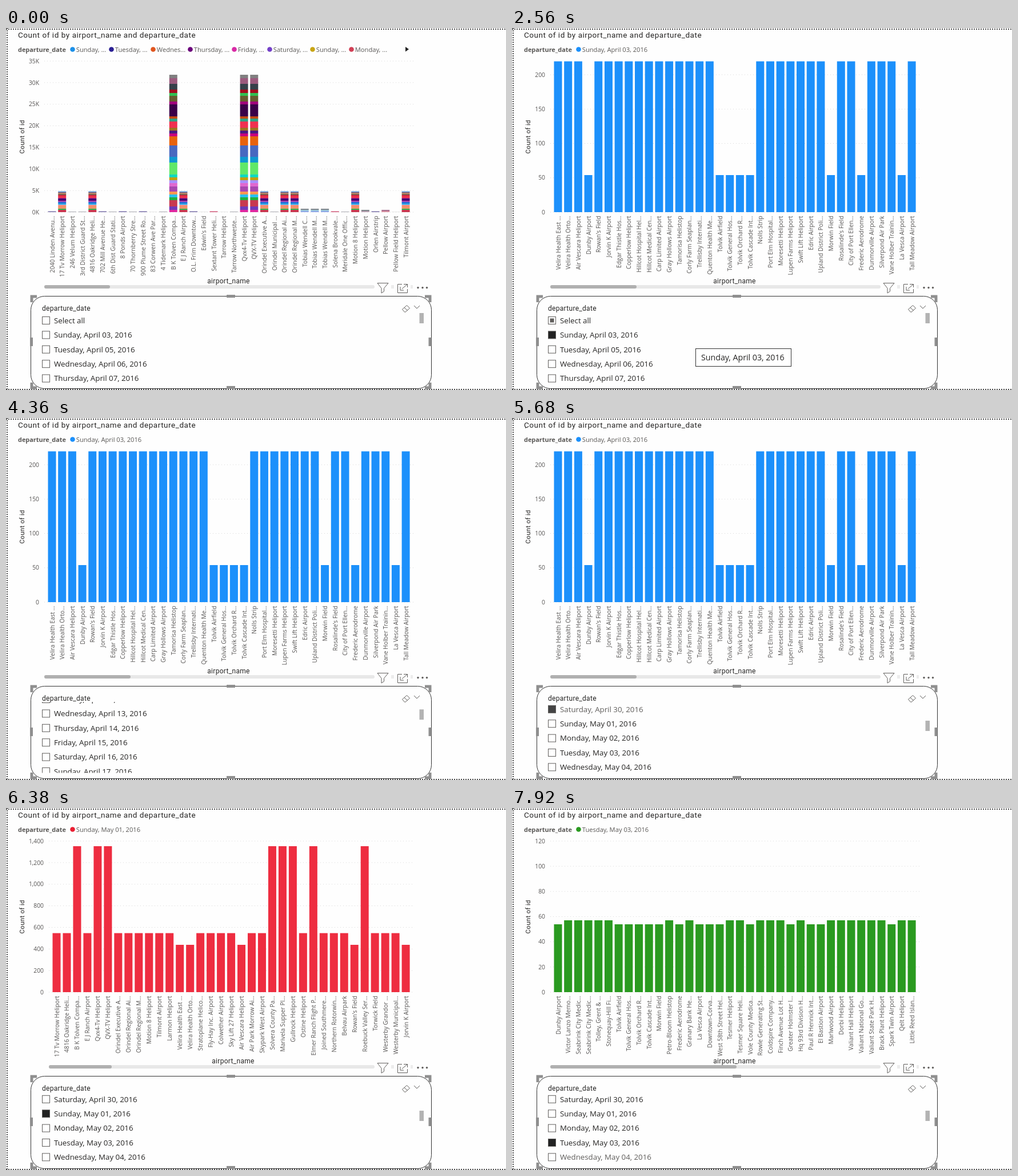
An HTML page that plays this animation: 875 by 635 pixels, repeating every 7.99 s.

```html
<!DOCTYPE html>
<html lang="en">
<head>
<meta charset="utf-8">
<style>
html, body { margin: 0; width: 100%; height: 100%; overflow: hidden; background: #fefefe; }
svg { display: block; width: 875px; height: 635px; font-family: "Open Sans", "Noto Sans", sans-serif; }
.din { font-family: Roboto, sans-serif; letter-spacing: .3px; font-size: 12px; fill: #252423; }
.title { font-size: 13.5px; letter-spacing: .55px; }
.legend { font-size: 11.15px; fill: #595755; }
.heading { font-size: 10.9px; font-weight: 700; }
.axis { font-size: 10.3px; fill: #555352; }
.row { font-size: 13.3px; }
.line { fill: none; stroke: #605e5c; }
</style>
</head>
<body>
<svg id="stage" viewBox="0 0 875 635"></svg>
<script>
const LOOP = 7990, BASE = 323, PLOT = 265, ROW = 25.4;
const BIG = '4 e028a0|6 7038b8|11 c83850|5 20b040|5 28c0f0|5 ff9850|9 a848b0|6 e068d0|5 a890ff|5 c0a010|5 10d8c0|21 60e868|10 1098d0|20 4868c0|16 e8620c|5 c8007e|5 4a1a80|5 a07020|11 f03050|5 30a085|4 c24a10|21 3a0048|5 a0007a|10 665d2e|5 30c050|6 a00c1c|10 36404a|10 9b5a7d|6 808080';
const MID = '4 c83850|2 30b850|6 f2906a|1 e58fc0|2 28b8e8|3 2870d8|2 b040b0|4 4a0070|1 c83088|5 e83048|1 303038|2 c89060|2 806070|2 88b0e0';

const charts = [
  {
    end: 1580, step: 5, max: 35, unit: 'K', left: 67, thumb: 182,
    levels: {
      T: BIG, M: MID, s: '2 8fa8e8|2 9bc8d8|2 80868c', r: '2 b8a0b0|2 80868c', p: '2 d890a0|2 a87090',
      q: '1.5 7a70a8', c: '1.5 d05878', a: '1 a8a8b0', o: '.5 d0d0d0'
    },
    bars: 'qMaaMqaqaqoaTMqocoaTTMaMMssscaMrqpoM',
    legend: [
      [116, '1c90e8', 'Sunday, ...'], [184, '2a1f93', 'Tuesday, ...'], [257, 'e0561f', 'Wednes...'],
      [322, '6b007b', 'Thursday, ...'], [399, 'd82aa5', 'Friday, ...'], [461, '7440c8', 'Saturday, ...'],
      [536, 'c8a514', 'Sunday, ...'], [604, 'd13f55', 'Monday, ...']
    ],
    names: '2040 Linden Avenu...|17 Tv Morrow Heliport|246 Velum Heliport|3rd District Guard St...|4816 Oakridge Heli...|702 Mill Avenue He...|6th Dist Guard Stati...|8 Ponds Airport|70 Thornberry Stre...|900 Plume Street Ro...|83 Corwen Ave Par...|4 Tidemark Heliport|B K Tolven Compa...|E J Ranch Airport|O.L. Frim Downtow...|Edwin\'s Field|Sextant Tower Heli...|Tarrow Heliport|Tarrow Northweste...|Qvx4-Tv Heliport|QVX-TV Heliport|Orindel Executive A...|Orindel Municipal ...|Orindel Regional Ai...|Orindel Regional M...|Tobias Wendell C...|Tobias Wendell M...|Tobias Wendell M...|Solena Brookvale...|Meridale One Offic...|Motion 8 Heliport|Motion Heliport|Orlen Airstrip|Pellow Airport|Pellow Field Heliport|Tilmont Airport'
  },
  {
    end: 6170, step: 50, max: 219.9, left: 67, thumb: 218,
    levels: { H: '264.5 1c90fb', L: '65 1c90fb' },
    bars: 'HHHLHHHHHHHHHHHHLLLLHHHHHHHLHHLHHHLH',
    legend: [[116, '1c90fb', 'Sunday, April 03, 2016']],
    names: 'Velira Health East ...|Velira Health Orto...|Air Vescara Heliport|Dunby Airport|Rowan\'s Field|Jorvin K Airport|Edgar Thistle Hos...|Copperlow Heliport|Hillcot Hospital Hel...|Hillcot Medical Cen...|Carp Limited Airport|Gray Hollows Airport|Tamorisa Helistop|Corly Farm Seaplan...|Trellisby Internati...|Quenton Health Me...|Tolvik Airfield|Tolvik General Hos...|Tolvik Orchard R...|Tolvik Cascade Int...|Nolls Strip|Port Elm Hospital...|Moresetti Heliport|Lupen Farms Heliport|Swift Lift Heliport|Edric Airport|Upland District Poli...|Morwin Field|Rosalinde\'s Field|City of Port Ellen...|Frederic Aerodrome|Dunmorville Airport|Silverpond Air Park|Vane Holber Trainin...|La Vesca Airport|Tall Meadow Airport'
  },
  {
    end: 6940, step: 200, max: 1400, left: 75, thumb: 185,
    levels: { H: '256 ee2d40', M: '103.5 ee2d40', L: '83 ee2d40' },
    bars: 'MMHMHHMMMMMMLLMMMMLMMHHHMHMMMLHMMML',
    legend: [[116, 'ea1f33', 'Sunday, May 01, 2016']],
    names: '17 Tv Morrow Heliport|4816 Oakridge Heli...|B K Tolven Compa...|E J Ranch Airport|Qvx4-Tv Heliport|QVX-TV Heliport|Orindel Executive A...|Orindel Regional Ai...|Orindel Regional M...|Motion 8 Heliport|Tilmont Airport|Larmon Heliport|Velira Health East ...|Velira Health Orto...|Stratoplane Helico...|Fly-Hay Inc. Airport|Colwether Airport|Sky Lift 27 Heliport|Air Vescara Heliport|Air Park Morrow Ai...|Skypark West Airport|Solvera County Pa...|Marivela Supper Pl...|Gullrock Heliport|Ostine Heliport|Elmer Ranch Flight P...|Joined Southmere...|Northern Rotorwin...|Belvau Airpark|Rowan\'s Field|Roebuck Valley Ser...|Torwick Field|Westerby Grandor ...|Westerby Municipal...|Jorvin K Airport'
  },
  {
    end: LOOP, step: 20, max: 120, left: 67, thumb: 393,
    levels: { H: '126 2a9a20', L: '119 2a9a20' },
    bars: 'LHHHHHLLLLLHLHLLLHHLHHHLHLLHHHHHHLHH',
    legend: [[116, '2a9a20', 'Tuesday, May 03, 2016']],
    names: 'Dunby Airport|Victor Lanzo Memo...|Seabrink City Medic...|Seabrink City Medic...|Tolley, Grent &amp; ...|Stonequay-Hill Fi...|Tolvik Airfield|Tolvik General Hos...|Tolvik Orchard R...|Tolvik Cascade Int...|Morwin Field|Petro-Bloom Helistop|Frederic Aerodrome|Granary Bank He...|La Vesca Airport|Downtown-Corva...|West 58th Street Hel...|Tesmer Heliport|Tesmer Square Heli...|Vole County Medica...|Rowle Generating St...|Coldspire Company...|Finch Avenue Lot H...|Greater Holmster I...|Hq 93rd Division H...|Paul R Hennick Int...|El Bastion Airport|Marlwood Airport|Dorbi Heliport|Valiant Hall Heliport|Valiant National Go...|Valiant State Park H...|Brack Plant Heliport|Spark Twin Airport|Qelt Heliport|Little Reed Islan...'
  }
];

const text = (x, y, s, attrs = '') => `<text x="${x}" y="${y}" ${attrs}>${s}</text>`;
const rect = (x, y, w, h, fill, attrs = '') =>
  `<rect x="${x}" y="${y}" width="${w}" height="${h}" fill="${fill}" ${attrs}/>`;
const path = (d, attrs = 'class="line"') => `<path d="${d}" ${attrs}/>`;

function stack(x, spec) {
  let y = BASE, out = '';
  for (const part of spec.split('|')) {
    const [h, color] = part.split(' ');
    y -= h;
    out += rect(x, y, 14, h, '#' + color);
  }
  return out;
}

function drawChart(c) {
  let out = '';
  for (let v = 0; v <= c.max; v += c.step) {
    const y = BASE - v / c.max * PLOT;
    out += path(`M${c.left} ${y}H714`, 'stroke="#d8d8d8" stroke-dasharray="1 4"');
    out += text(c.left - 9, y + 3.7, v.toLocaleString('en-US') + (c.unit || ''), 'class="axis" text-anchor="end"');
  }
  const names = c.names.split('|'), first = c.left + 13.5;
  const pitch = (699.6 - first) / (names.length - 1);
  names.forEach((name, i) => {
    const x = first + i * pitch;
    out += stack(x - 7, c.levels[c.bars[i]]);
    out += `<text class="axis" text-anchor="end" transform="translate(${x + 4} 329.5) rotate(-90)">${name}</text>`;
  });
  for (const [x, color, label] of c.legend)
    out += `<circle cx="${x + .5}" cy="37.5" r="4.3" fill="#${color}"/>` + text(x + 6.8, 41.7, label, 'class="legend"');
  if (c.legend.length > 1) out += path('M699 33l6 4.3l-6 4.3z', 'fill="#222"');
  out += text(c.left + 322.5, 448, 'airport_name', 'class="din" text-anchor="middle"');
  out += rect(c.left, 451, 645 - c.left, 6, '#e8e8e8', 'rx="3"');
  out += rect(c.left, 451, c.thumb - c.left, 6, '#b0b0b0', 'rx="3"');
  return `<g class="chart">${out}</g>`;
}

function rowLabel(i) {
  if (!i) return 'Select all';
  return new Date(2016, 3, i === 1 ? 3 : i + 3).toLocaleDateString('en-US',
    { weekday: 'long', month: 'long', day: '2-digit', year: 'numeric' });
}

function drawRow(i) {
  const y = 513 + i * ROW;
  return `<g class="row">${rect(63.5, y - 6.5, 13, 13, '#fff', 'stroke="#605e5c"')}
    ${i ? '' : rect(66.5, y - 3.5, 7, 7, '#605e5c', 'id="partial"')}${text(84, y + 4.7, rowLabel(i))}</g>`;
}

const handles = [[386, 468, 15, 5], [386, 628, 15, 5], [42, 543, 5, 15], [739.5, 543, 5, 15]]
  .map(h => rect(...h, '#8f8f8f')).join('');

document.getElementById('stage').innerHTML = `
  <defs><clipPath id="list"><rect x="60" y="498" width="640" height="124.5"/></clipPath></defs>
  ${path('M0 2H875M2 0V635M0 634H875', 'stroke="#4a4a4a" stroke-width="2" stroke-dasharray="2 2"')}
  ${text(21, 17, 'Count of id by airport_name and departure_date', 'class="din title"')}
  ${text(21, 41.7, 'departure_date', 'class="legend heading"')}
  <text class="din" style="font-size:11.5px" transform="translate(32 220.5) rotate(-90)">Count of id</text>
  ${charts.map(drawChart).join('')}
  <circle id="dot" r="1" fill="#444"/>
  ${rect(674, 451, 5, 6, '#ececec')}${rect(708, 451, 4, 6, '#ececec')}
  ${path('M650 447.5H669L661.5 456.5V462L657 465V456.5Z')}
  ${path('M693 449.5H685.5V464.5H702.5V458M696 449.5H702.5V455M702.5 449.5L693 457.5M690 454V460H696')}
  ${[721, 729, 736.5].map(x => `<circle cx="${x}" cy="455.5" r="1.7" fill="#605e5c"/>`).join('')}
  ${rect(43.5, 470.5, 701, 162, '#fefefe', 'rx="24" stroke="#333"')}
  ${path('M45 481V471H54M733 471H742V481M45 622V631H54M733 631H742V622', 'fill="none" stroke="#8f8f8f" stroke-width="5"')}
  ${handles}
  ${text(63, 496, 'departure_date', 'class="din"')}
  ${path('M693.5 493.5L701.5 486.5L706.5 491.5L699 498.2H697.5ZM697 490.5L702.5 495.3')}
  ${path('M714 487L719 492L724 487')}
  <g clip-path="url(#list)"><g id="rows">${Array.from({ length: 34 }, (_, i) => drawRow(i)).join('')}</g></g>
  ${rect(723.5, 500, 7.5, 18, '#b3b3b3', 'id="thumb"')}
  <g id="tip">${rect(321.5, 562.5, 167, 31, '#fff', 'stroke="#333"')}${text(331, 583, rowLabel(1), 'class="row" style="font-size:14.2px" fill="#252423"')}</g>`;

const $ = id => document.getElementById(id);
const chartNodes = [...document.querySelectorAll('.chart')];
const rows = [...$('rows').children];
const show = (node, on) => node.setAttribute('visibility', on ? 'visible' : 'hidden');

// Each entry holds its row until the given time.
const selected = [[760, -1], [5400, 1], [5900, 27], [6600, 28], [LOOP, 30]];
const hovered = [[280, -1], [1720, 1], [4780, -1], [5820, 27], [6200, 28], [6450, -1], [7290, 30], [LOOP, 31]];
const at = (list, t) => list.find(([end]) => t < end)[1];
const busy = [[1000, 1580], [5540, 6170], [6660, 6940]];
const scrollKeys = [[3880, 0], [4360, 247], [4640, 688]];

function scrollAt(t) {
  if (t <= scrollKeys[0][0]) return 0;
  for (let i = 1; i < scrollKeys.length; i++) {
    const [t0, s0] = scrollKeys[i - 1], [t1, s1] = scrollKeys[i];
    if (t < t1) return s0 + (s1 - s0) * (t - t0) / (t1 - t0);
  }
  return 688;
}

function render(t) {
  const current = charts.findIndex(c => t < c.end);
  chartNodes.forEach((node, i) => show(node, i === current));

  const pick = at(selected, t), hover = at(hovered, t);
  rows.forEach((row, i) => {
    const over = i === hover;
    row.firstElementChild.setAttribute('fill', i !== pick ? '#fff' : over ? '#444' : '#222');
    row.lastElementChild.setAttribute('fill', over ? '#605e5c' : '#252423');
  });
  show($('partial'), pick > 0);

  const scroll = scrollAt(t);
  $('rows').setAttribute('transform', `translate(0 ${-scroll})`);
  $('thumb').setAttribute('y', 500 + scroll * .045);
  show($('tip'), t >= 2100 && t < 2870);

  const angle = (t - 1370) / 958 * 2 * Math.PI + .98;
  $('dot').setAttribute('cx', 25 + 1.8 * Math.cos(angle));
  $('dot').setAttribute('cy', 18.5 + 1.8 * Math.sin(angle));
  show($('dot'), busy.some(([from, to]) => t >= from && t < to));
}

function tick() {
  render(performance.now() % LOOP);
  requestAnimationFrame(tick);
}
tick();
</script>
</body>
</html>
```
